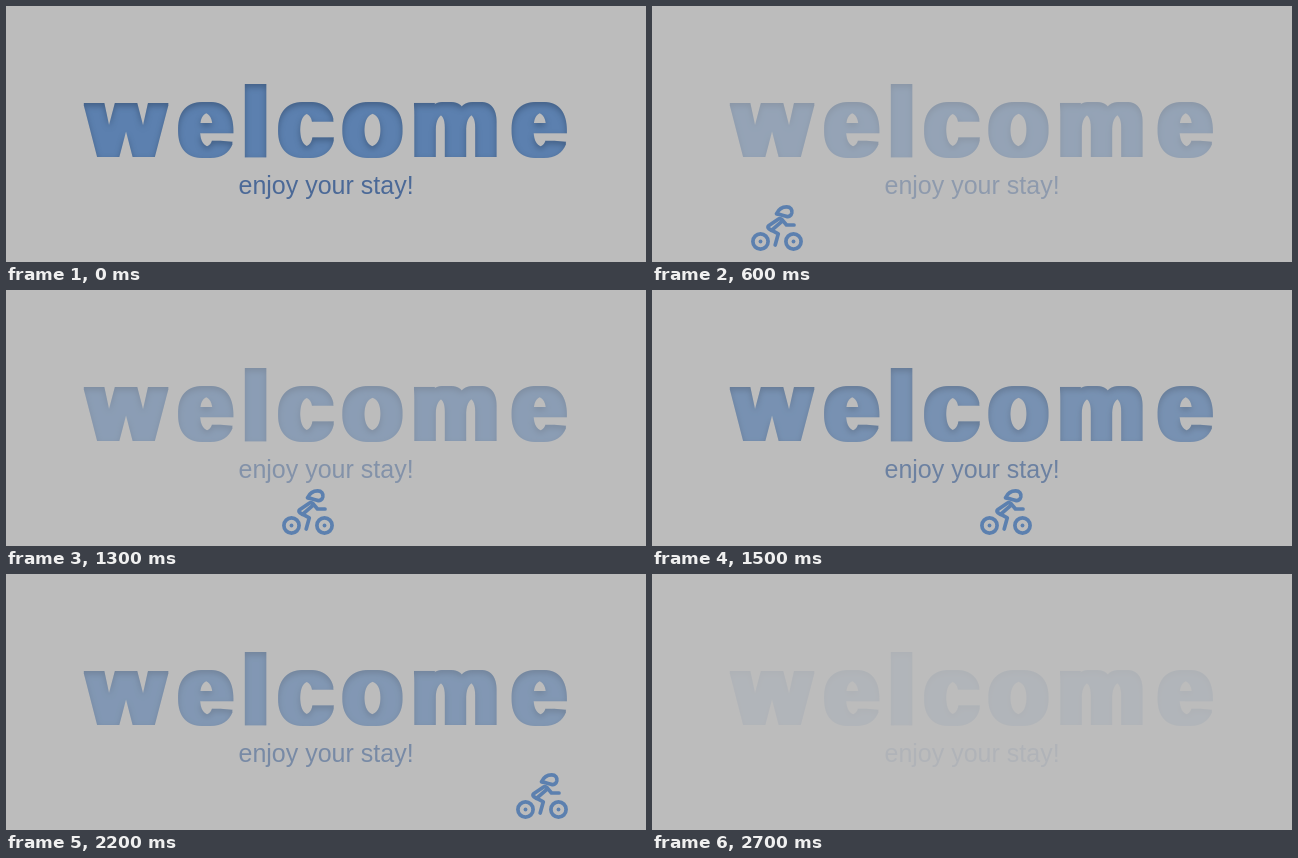
Recreate the animation shown at these times as an HTML page. Size 640x256 px, loop 2.8 s.

```html
<!DOCTYPE html>
<html lang="en">
<head>
<meta charset="utf-8">
<title>Welcome</title>
<style>
  html, body { margin: 0; width: 100%; height: 100%; overflow: hidden; background: #bcbcbc; }
  svg { display: block; width: 640px; height: 256px; }
  .title {
    font: bold 98px "Liberation Sans", Arial, sans-serif;
    text-anchor: middle;
    fill: #5c80af;
    filter: url(#inset);
  }
  .sub { font: 25px "Liberation Sans", Arial, sans-serif; fill: #4b6997; }
  .line { fill: none; stroke: #5c80af; stroke-width: 3.7; stroke-linecap: round; stroke-linejoin: round; }
  .hub { fill: #5c80af; }
</style>
</head>
<body>
<svg viewBox="0 0 640 256">
  <defs>
    <!-- Heavier stems, then a soft inner shadow from above -->
    <filter id="inset" color-interpolation-filters="sRGB" x="-5%" y="-20%" width="110%" height="140%">
      <feMorphology in="SourceGraphic" operator="dilate" radius="4 1" result="heavy"/>
      <feComponentTransfer in="heavy">
        <feFuncR type="discrete" tableValues="0"/>
        <feFuncG type="discrete" tableValues="0"/>
        <feFuncB type="discrete" tableValues="0"/>
        <feFuncA type="linear" slope="-1" intercept="1"/>
      </feComponentTransfer>
      <feGaussianBlur stdDeviation="3"/>
      <feOffset dy="3" result="edge"/>
      <feFlood flood-color="#1c2c46" flood-opacity=".4"/>
      <feComposite in2="edge" operator="in"/>
      <feComposite in2="heavy" operator="in" result="shade"/>
      <feMerge>
        <feMergeNode in="heavy"/>
        <feMergeNode in="shade"/>
      </feMerge>
    </filter>
  </defs>
  <rect width="640" height="256" fill="#bcbcbc"/>
  <g id="words">
    <text class="title" x="120 199.5 249.5 299.5 366.5 449 533" y="149.5">welcome</text>
    <text class="sub" x="232.5" y="188">enjoy your stay!</text>
  </g>
  <g id="bike">
    <g class="line">
      <circle cx="9.5" cy="36.5" r="7.6"/>
      <circle cx="42.5" cy="36.5" r="7.6"/>
      <path d="M25.5 8.8C27.6 4.4 31.6 1.9 35.6 1.9C39.6 1.9 41.4 4.6 40.8 7.8C40.2 10.6 38 12 35.5 11.4C32.3 10.6 29 9.2 25.5 8.8Z"/>
      <path d="M43 20H35.5L31 14.6Q29.2 12.8 27.2 14.2L17.6 20.8Q16.2 22.2 17.8 23.6L20.5 25.4L31.5 15.8"/>
      <path d="M20.5 25.2L27.3 28.8L24.2 40"/>
    </g>
    <circle class="hub" cx="9.5" cy="36.5" r="1.9"/>
    <circle class="hub" cx="42.5" cy="36.5" r="1.9"/>
  </g>
</svg>
<script>
  const LOOP = 2800, STEP = 100, FADE = 9;
  // [step, x] stops of the ride, linear in between
  const RIDE = [[0, -53], [1, -26], [4, 52], [6, 99], [9, 172], [27, 640]];
  const words = document.getElementById('words');
  const bike = document.getElementById('bike');

  function rideX(step) {
    const i = Math.max(1, RIDE.findIndex(([s]) => s >= step));
    const [s0, x0] = RIDE[i - 1], [s1, x1] = RIDE[i];
    return Math.round(x0 + (x1 - x0) * (step - s0) / (s1 - s0));
  }

  // Fades from 1 to 0.1 and back, one tenth per step
  function fade(step) {
    return 0.1 + 0.1 * Math.abs(FADE - step % (2 * FADE));
  }

  function draw() {
    const step = Math.floor(performance.now() % LOOP / STEP);
    words.setAttribute('opacity', fade(step).toFixed(2));
    bike.setAttribute('transform', `translate(${rideX(step)} 199)`);
    requestAnimationFrame(draw);
  }
  draw();
</script>
</body>
</html>
```
